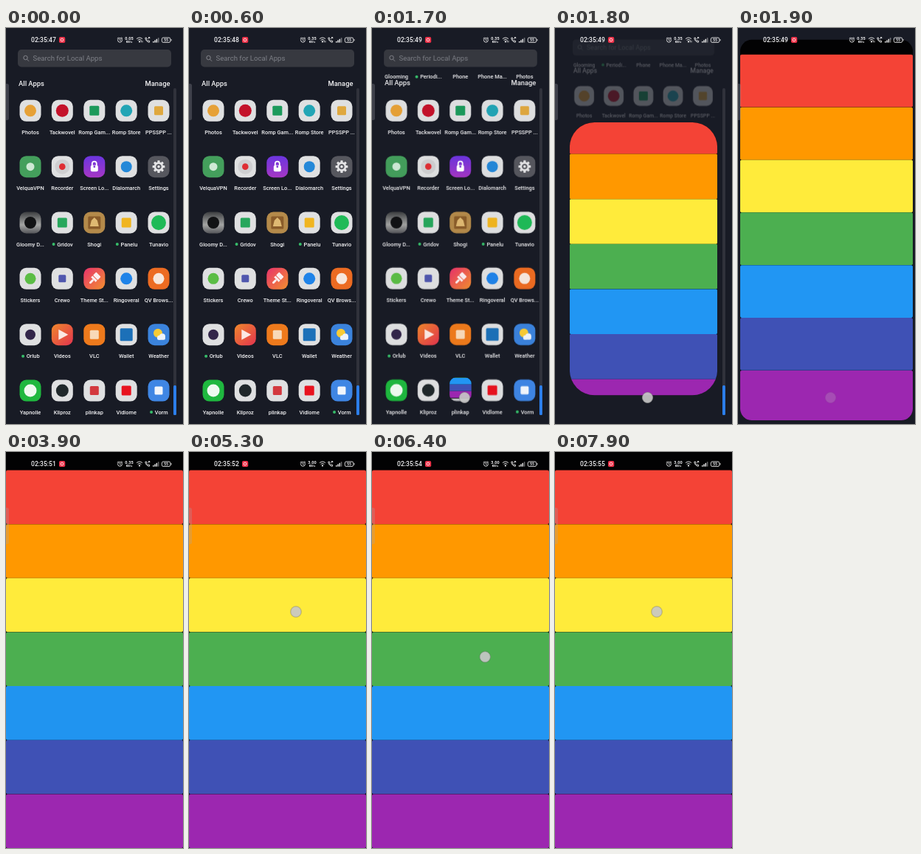
These frames come from a looping animation (240 px wide and 533 px high, 8 s). An HTML page:

```html
<!DOCTYPE html>
<html lang="en">
<head>
<meta charset="utf-8">
<title>Phone launcher</title>
<style>
html, body { margin: 0; width: 100%; height: 100%; overflow: hidden; background: #181b25; }
svg { display: block; width: 100vw; height: 100vh; }
text { font-family: Roboto, "Open Sans", sans-serif; font-weight: 500; fill: #f1f1f3; }
</style>
</head>
<body>
<svg id="stage" viewBox="0 0 240 533">
  <defs>
    <linearGradient id="purple" x2="0" y2="1"><stop stop-color="#6b35e0"/><stop offset="1" stop-color="#a637c4"/></linearGradient>
    <linearGradient id="sunset" x2="1" y2="1"><stop stop-color="#e8326c"/><stop offset="1" stop-color="#f2902f"/></linearGradient>
    <linearGradient id="ember" x2="1" y2="1"><stop stop-color="#f0882c"/><stop offset="1" stop-color="#e2344f"/></linearGradient>
    <linearGradient id="mist" x2="0" y2="1"><stop stop-color="#3c3e40"/><stop offset=".6" stop-color="#a4a5a4"/><stop offset="1" stop-color="#55565a"/></linearGradient>
    <clipPath id="windowClip"><rect id="windowRect"/></clipPath>
    <clipPath id="rippleClip"><rect id="rippleRect" width="240" height="72.6" rx="2"/></clipPath>
  </defs>
  <rect width="240" height="533" fill="#181b25"/>
  <g id="launcher">
    <g id="hiddenRow"></g>
    <rect x="16" y="29" width="208" height="23.5" rx="5" fill="#373940"/>
    <g fill="none" stroke="#85868c"><circle cx="26.5" cy="40" r="2.7"/><path d="M28.6 42.2l2.4 2.5"/></g>
    <text x="36.5" y="44.2" font-size="9.6" style="font-weight:400;fill:#7e8087">Search for Local Apps</text>
    <text x="17" y="77.5" font-size="9.4">All Apps</text>
    <text x="222.5" y="77.5" font-size="9.4" text-anchor="end">Manage</text>
    <g id="apps"></g>
  </g>
  <g id="scrollbar">
    <rect x="227" y="81" width="4" height="440" rx="2" fill="#30323b"/>
    <rect x="227" y="481" width="4" height="40" rx="1.5" fill="#2c7eea"/>
  </g>
  <g id="app" clip-path="url(#windowClip)">
    <g id="content">
      <rect y="-60" width="240" height="600" fill="#020203"/>
      <g id="bands"></g>
      <g clip-path="url(#rippleClip)"><circle id="ripple" fill="#1b76cf"/></g>
    </g>
  </g>
  <rect x="-4" y="75" width="8" height="49" rx="2.5" fill="#a6a8ad" opacity=".27"/>
  <g id="status">
    <text id="clock" x="34" y="19.1" font-size="8.6"></text>
    <rect x="72" y="12" width="8.2" height="8" rx="1.8" fill="#ee3249"/>
    <circle cx="76" cy="16" r="1.9" fill="none" stroke="#fff" stroke-width=".8"/>
    <g fill="none" stroke="#eee" stroke-width=".9">
      <circle cx="154.5" cy="16.3" r="2.9"/>
      <path d="M154.5 14.6v1.9l1.3.7M151 14.2l1.6-1.6M158 14.2l-1.6-1.6"/>
      <path d="M177 14.6q4-3.3 8 0M178.6 16.4q2.4-2 4.8 0"/>
      <path d="M188.8 13.2q.4 4.6 5.4 6.2l.6-1.8-1.9-.9-.9.8q-1.4-.8-1.8-2.2l.8-.7-.6-1.6zM192.3 14.6l2.4-2M194.8 14.2v-1.7h-1.7"/>
      <rect x="211.4" y="13" width="11.4" height="6.4" rx="1.8"/>
      <path d="M224 15v2.4"/>
    </g>
    <circle cx="181" cy="18.4" r="1.1" fill="#eee"/>
    <path id="wifiMark" d="M183.3 19.3v-2.5M185 17v2.5" stroke="#eee" stroke-width=".8"/>
    <g id="bars" fill="#eee"></g>
    <text id="rate" x="167" y="16.2" font-size="5.6" text-anchor="middle" style="font-weight:700"></text>
    <text x="167" y="20" font-size="4" text-anchor="middle" style="font-weight:700">KB/s</text>
    <text x="217.1" y="18.2" font-size="5.4" text-anchor="middle">55</text>
  </g>
  <g id="touch">
    <circle r="7.8" fill="#444" opacity=".3"/>
    <circle r="7" fill="#cdcdcd" stroke="#a9a9a9" stroke-width=".7" opacity=".88"/>
  </g>
</svg>
<script>
const $ = id => document.getElementById(id);
const NS = "http://www.w3.org/2000/svg";
const LOOP = 8000, BAND_TOP = 24.5, BAND_H = 72.65;
const COLUMNS = [33, 76.3, 119.8, 163.2, 207];

function add(parent, tag, attrs) {
  const el = document.createElementNS(NS, tag);
  set(el, attrs);
  parent.appendChild(el);
  return el;
}
function set(el, attrs) {
  for (const key in attrs) el.setAttribute(key, attrs[key]);
}

// Glyph helpers, all centred on 0,0
const disc = (color, r = 8) => `<circle r="${r}" fill="${color}"/>`;
const box = (color, s = 13) => `<rect x="${-s / 2}" y="${-s / 2}" width="${s}" height="${s}" rx="1.5" fill="${color}"/>`;
const path = (d, color) => `<path d="${d}" fill="${color}"/>`;
const gear = () => {
  let teeth = "";
  for (let a = 0; a < 360; a += 45) teeth += `<rect x="-1.6" y="-8.4" width="3.2" height="4" rx=".6" fill="#e4e4e6" transform="rotate(${a})"/>`;
  return teeth + '<circle r="5" fill="none" stroke="#e4e4e6" stroke-width="2.6"/>' + disc("#e4e4e6", 1.8);
};
const lock = '<path d="M-3-1v-3a3 3 0 0 1 6 0v3" fill="none" stroke="#fff" stroke-width="1.8"/><rect x="-5" y="-2" width="10" height="8.5" rx="2" fill="#fff"/>' + disc("#7a35d6", 1.4);
const brush = '<g transform="rotate(45)" fill="#fbeef0"><rect x="-4.5" y="-8" width="9" height="6" rx="1"/><rect x="-4.5" y="-1" width="9" height="3"/><rect x="-1.5" y="2" width="3" height="7" rx="1.4"/></g>';
const weather = `<circle cx="-1" cy="-2" r="6" fill="#f8cb35"/><g fill="#eef3fa"><circle cx="1" cy="4" r="3"/><circle cx="5" cy="2.5" r="4"/><rect x="-2" y="3" width="11" height="4" rx="2"/></g>`;
const record = '<circle r="10" fill="#cfcfd1"/>' + disc("#df2d33", 4.3);
const board = box("#8a5c2a", 17) + path("M-6 5L-4-3L0-7L4-3L6 5z", "#dfb972");

const PALE = "#dfe0e1";
// label, tile fill, glyph, new badge
const ROWS = [
  [["Photos", PALE, disc("#e6a137")], ["Tackwovel", PALE, disc("#c4122a", 8.5)], ["Romp Gam...", PALE, box("#1c9a5b")], ["Romp Store", PALE, disc("#23a5b5")], ["PPSSPP ...", PALE, box("#dfa83f", 12)]],
  [["VelquaVPN", "#449f5c", disc("#cfe9d5", 5.5)], ["Recorder", PALE, record], ["Screen Lo...", "url(#purple)", lock], ["Dialomarch", PALE, disc("#2488d8", 7.5)], ["Settings", "#56575e", gear()]],
  [["Gloomy D...", "url(#mist)", disc("#111214", 8)], ["Gridov", PALE, box("#27a75c"), 1], ["Shogi", "#b48a4a", board], ["Panelu", PALE, box("#f0b520"), 1], ["Tunavio", PALE, disc("#1fba57", 10)]],
  [["Stickers", PALE, disc("#5bbd45", 7.5)], ["Crewo", PALE, box("#5057ae", 10)], ["Theme St...", "url(#sunset)", brush], ["Ringoveral", PALE, disc("#1f83e8")], ["QV Brows...", "#ec6b22", disc("#f7e7dc", 7.5)]],
  [["Orlub", PALE, disc("#33264a", 7), 1], ["Videos", "url(#ember)", path("M-5-7L8 0L-5 7z", "#fbe9e4")], ["VLC", "#ee7a1c", box("#f8d9b8", 12)], ["Wallet", PALE, box("#1c70b8", 17)], ["Weather", "#3b83dc", weather]],
  [["Yapnolle", "#1fb83f", disc("#eefaf0", 8.5)], ["Kliproz", PALE, disc("#20282b", 8.5)], ["plinkap", PALE, box("#d3393f", 12)], ["Vidlome", PALE, box("#e8131f", 13)], ["Vorm", "#3f86e4", box("#f2f6fc", 11), 1]]
];

function label(parent, name, x, y, badge) {
  const text = add(parent, "text", { x: badge ? x + 3.7 : x, y, "font-size": 7.4, "text-anchor": "middle" });
  text.textContent = name;
  if (badge) {
    const half = text.getComputedTextLength() / 2;
    add(parent, "circle", { cx: x - 1 - half, cy: y - 2.6, r: 2, fill: "#37bd6a" });
  }
}

let pressed;
ROWS.forEach((row, r) => row.forEach(([name, fill, glyph, badge], c) => {
  const y = 111.3 + r * 75.35;
  const icon = add($("apps"), "g", { transform: `translate(${COLUMNS[c]} ${y})` });
  add(icon, "rect", { x: -14.5, y: -14.5, width: 29, height: 29, rx: 9, fill });
  icon.insertAdjacentHTML("beforeend", glyph);
  label($("apps"), name, COLUMNS[c], y + 31.6, badge);
  if (r === 5 && c === 2) pressed = icon;
}));
["Glooming", "Periodi...", "Phone", "Phone Ma...", "Photos"].forEach((name, c) =>
  label($("hiddenRow"), name, COLUMNS[c], 68.5, c === 1));

["#f44336", "#ff9800", "#ffeb3b", "#4caf50", "#2196f3", "#3f51b5", "#9c27b0"].forEach((fill, i) =>
  add($("bands"), "rect", { y: BAND_TOP + i * BAND_H, width: 240, height: BAND_H - .1, rx: 2, fill }));

for (let i = 0; i < 4; i++)
  add($("bars"), "rect", { x: 199 + i * 2.3, y: 18 - i * 1.6, width: 1.5, height: 1.6 + i * 1.6, opacity: i < 3 ? 1 : .45 });

const clamp = v => Math.max(0, Math.min(1, v));
const mix = (a, b, p) => a + (b - a) * p;

// Piecewise linear track of [time, ...values]
function track(keys, t) {
  let i = 0;
  while (i < keys.length - 2 && t > keys[i + 1][0]) i++;
  const [a, b] = [keys[i], keys[i + 1]];
  const p = clamp((t - a[0]) / (b[0] - a[0]));
  return a.slice(1).map((v, k) => mix(v, b[k + 1], p));
}

// x, y, width, height, radius, content scale, content offset
const OPENING = [
  [1700, 106, 474, 28, 28, 8, .117, 435],
  [1800, 20, 128, 200, 366, 34, .8333, 89.2],
  [1900, 3, 16, 234, 512, 16, .975, 12],
  [2000, 0, 0, 240, 533, 0, 1, 0]
];
// start, end, x, y, band
const TAPS = [
  [1600, 1900, 125.5, 497.5],
  [3700, 3850, 150, 350, 4],
  [5300, 5500, 145, 215, 2],
  [6400, 6600, 153.3, 275.8, 3],
  [7900, 8100, 138, 215, 2]
];

function drawTouch(t) {
  const tap = TAPS.find(([from, to]) => t >= from && t < to);
  const trace = t >= 1900 && t < 2350;
  const [, , x, y] = tap || TAPS[0];
  set($("touch"), {
    transform: `translate(${x} ${y})`,
    opacity: tap ? 1 : trace ? mix(.25, 0, clamp((t - 2000) / 350)) : 0
  });
}

function drawRipple(t) {
  const tap = TAPS.find(([from, , , , band]) => band !== undefined && t >= from && t < from + 450);
  if (!tap) return set($("ripple"), { opacity: 0 });
  const [from, , x, y, band] = tap, age = t - from;
  set($("rippleRect"), { y: BAND_TOP + band * BAND_H });
  set($("ripple"), { cx: x, cy: y, r: age * .75, opacity: .09 * clamp((420 - age) / 200) });
}

function render(t) {
  const seconds = 47 + Math.floor((t + 600) / 1000);
  $("clock").textContent = "02:35:" + seconds;
  $("rate").textContent = t < 400 ? "0.05" : t < 4400 ? "0.35" : "3.00";
  set($("wifiMark"), { opacity: t < 3700 ? .9 : 0 });

  const p = clamp((t - 1700) / 100);
  const scale = mix(1, .925, p);
  set($("launcher"), {
    transform: `translate(${120 * (1 - scale)} ${-11.5 * p}) scale(${scale})`,
    opacity: t < 1800 ? mix(1, .3, p) : mix(.3, 0, clamp((t - 1800) / 100))
  });
  set($("hiddenRow"), { opacity: t > 1700 ? 1 : 0 });
  set($("scrollbar"), { opacity: t < 1900 ? 1 : 0 });
  set(pressed, { opacity: t >= 1600 ? .85 : 1 });

  const [x, y, width, height, rx, size, top] = track(OPENING, t);
  set($("windowRect"), { x, y, width, height, rx });
  set($("content"), { transform: `translate(${120 * (1 - size)} ${top}) scale(${size})` });
  set($("app"), { visibility: t > 1700 ? "visible" : "hidden" });

  drawRipple(t);
  drawTouch(t);
}

const start = performance.now();
function frame(now) {
  render(Math.max(0, now - start) % LOOP);
  requestAnimationFrame(frame);
}
render(0);
requestAnimationFrame(frame);
</script>
</body>
</html>
```
